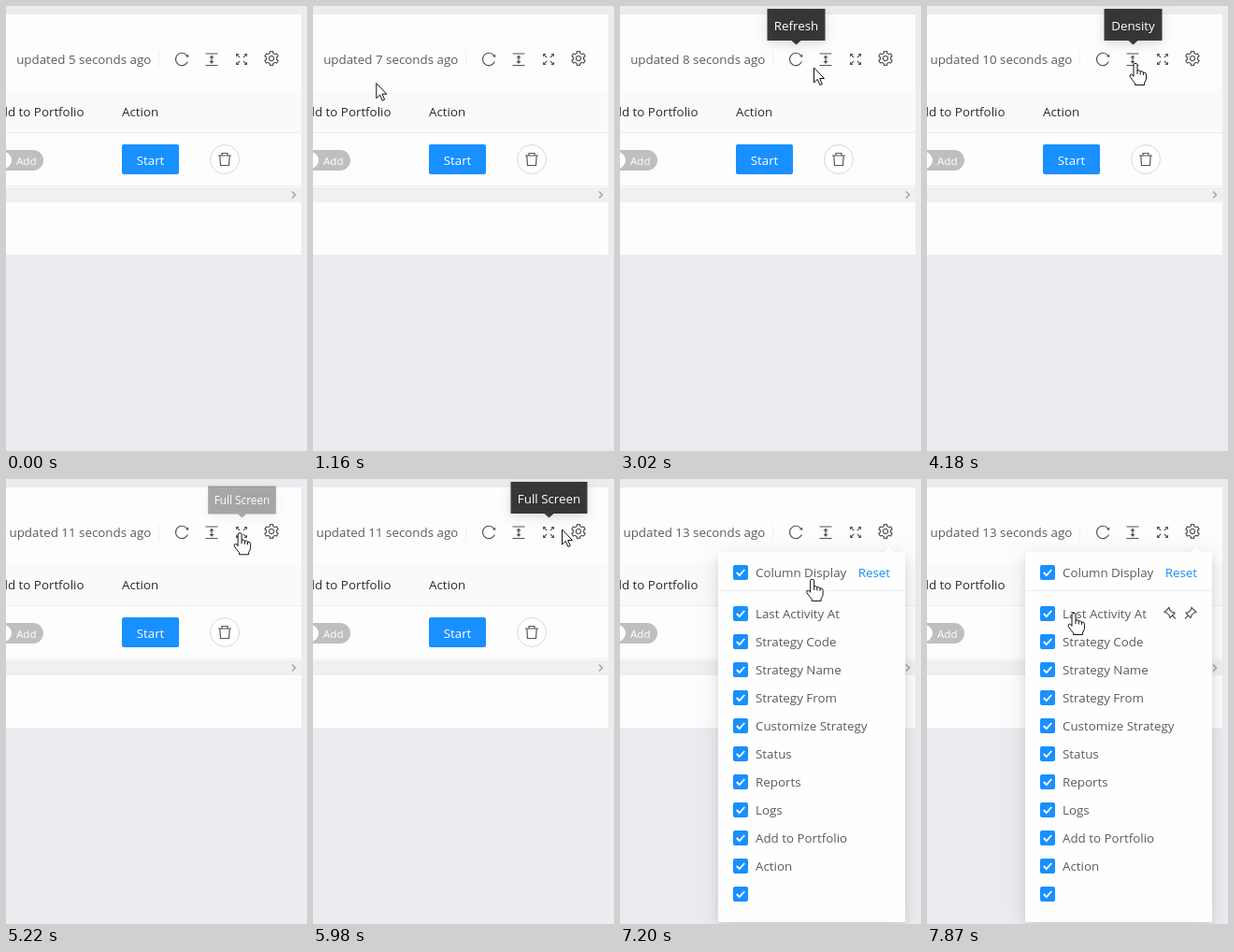
An HTML page for the animation above (8 s loop, 322 px wide and 476 px high).

```html
<!DOCTYPE html>
<html lang="en">
<head>
<meta charset="utf-8">
<title>Table toolbar</title>
<style>
  html, body { margin: 0; width: 100%; height: 100%; overflow: hidden; background: #eaecf0; }
  svg { display: block; font: 13.35px "Open Sans", "Noto Sans", sans-serif; fill: #5c5c5c; }
  .head { fill: #2b2b2b; }
  .end { text-anchor: end; }
  .mid { text-anchor: middle; }
  .line { fill: none; stroke: #555; stroke-width: 1.2; }
  .solid { fill: #555; stroke: none; }
  .white { fill: #fff; }
  .blue { fill: #1890ff; }
  .tip { filter: drop-shadow(0 3px 6px rgba(0, 0, 0, .18)); }
  .card { filter: drop-shadow(0 3px 4px rgba(0, 0, 0, .08)) drop-shadow(0 5px 12px rgba(0, 0, 0, .1)); }
  .cursor path { fill: #fff; stroke: #111; stroke-linejoin: round; }
</style>
</head>
<body>
<svg width="322" height="476" viewBox="0 0 322 476">
  <rect y="9" width="316" height="257" fill="#fdfdfd"/>
  <rect y="90" width="316" height="45" fill="#fafafa"/>
  <path d="M0 135.5H316M0 192.5H316M163.5 49V65" fill="none" stroke="#eee"/>
  <rect y="194" width="316" height="16" fill="#f0f0f0"/>
  <path d="M306 198.5l3.5 3.5-3.5 3.5" fill="none" stroke="#a0a0a0" stroke-width="1.4"/>

  <text id="age" class="end" x="155.3" y="62"></text>
  <text class="head end" x="83.5" y="118">Add to Portfolio</text>
  <text class="head" x="124" y="118">Action</text>

  <rect x="-14" y="154" width="54" height="22" rx="11" fill="#bfbfbf"/>
  <circle class="white" cx="-3" cy="165" r="9"/>
  <text class="white" x="11" y="170" font-size="11.6">Add</text>
  <rect class="blue" x="124" y="148" width="61" height="32" rx="2"/>
  <text class="white mid" x="154.5" y="170">Start</text>
  <circle cx="234" cy="164" r="15.5" fill="#fff" stroke="#d9d9d9"/>
  <path class="line" d="M227 160H241M231 160V157.5H237V160M228.8 160L229.5 170.5H238.5L239.2 160"/>

  <g class="line">
    <g transform="translate(188 57)">
      <path d="M6.4 2.4A6.7 6.7 0 1 1 5.4 -4.2"/>
      <path class="solid" d="M4 -3L7.2 -2.1V-5.5Z"/>
    </g>
    <g transform="translate(220 57)">
      <path d="M-6.5 -6H6.5M-6.5 6.5H6.5M0 -3V3"/>
      <path class="solid" d="M0 -4.4l2.5 3h-5zM0 5l2.5-3h-5z"/>
    </g>
    <g id="expand" transform="translate(252 57)"></g>
    <g transform="translate(284 56)">
      <path id="gear"/>
      <circle r="2.6"/>
    </g>
  </g>

  <g id="panel"></g>
  <g id="tips"></g>
  <g id="cursor" class="cursor">
    <path id="arrow" d="M0 0V16L3.8 12.4L6.4 18.5L8.8 17.5L6.2 11.5H11Z"/>
    <g id="hand">
      <path d="M-2 1.8Q-2 .4 0 .4Q2 .4 2 1.8V8Q4.6 7 5.2 9Q7.6 8 8.4 10Q11.5 9.6 11.5 12.3V16Q11.5 19 9.5 21V23.5H-.5V21.5Q-3 19 -5.8 14.6Q-6.4 12.2 -4.5 12.1Q-3 12.3 -2 14.3Z"/>
      <path d="M2 8V12M5.2 9V12.5M8.4 10V13"/>
    </g>
  </g>
</svg>
<script>
const LOOP = 8000, STEP = 20;
const CLICK = 6880;      // the settings panel opens
const TIP_IN = 150;      // hover time before a tooltip opens
const TIP_OUT = 300;     // time it stays after the pointer has left
const $ = id => document.getElementById(id);
const clamp = v => Math.min(1, Math.max(0, v));
const show = (el, on) => { el.style.display = on ? '' : 'none'; };

// Four diagonal arrows, one per corner.
$('expand').innerHTML = [0, 90, 180, 270].map(turn => `
  <g transform="rotate(${turn})">
    <path d="M1.8 1.8L4.8 4.8"/><path class="solid" d="M6 6H2.4L6 2.4Z"/>
  </g>`).join('');

// Six teeth, one pointing up.
const polar = (deg, r) => {
  const a = deg * Math.PI / 180;
  return `${(r * Math.sin(a)).toFixed(2)} ${(-r * Math.cos(a)).toFixed(2)}`;
};
const teeth = Array.from({ length: 6 }, (_, k) => {
  const a = k * 60;
  return [polar(a - 19, 5.7), polar(a - 12, 7.5), polar(a + 12, 7.5), polar(a + 19, 5.7)];
});
$('gear').setAttribute('d', `M${teeth.flat().join('L')}Z`);

// Column settings panel.
const columns = ['Last Activity At', 'Strategy Code', 'Strategy Name', 'Strategy From',
  'Customize Strategy', 'Status', 'Reports', 'Logs', 'Add to Portfolio', 'Action', ''];
const option = (label, y) => `
  <rect class="blue" x="121" y="${y - 8}" width="16" height="16" rx="2"/>
  <path d="M124.8 ${y}l3 3.2 5.4-6.2" fill="none" stroke="#fff" stroke-width="1.9"/>
  <text x="145" y="${y + 5}">${label}</text>`;
const pin = (x, flip) => `<path class="line" transform="translate(${x} 143.5) scale(${flip} 1)"
  d="M1 -6L6 -1L3.5 -.3L.8 2.4Q1 4 0 5L-5 0Q-4 -1 -2.4 -.8L.3 -3.5ZM-2.5 2.5L-6 6"/>`;
$('panel').innerHTML = `
  <path class="card" d="M107 78H282L287.5 72.5L293 78H303Q305 78 305 80V472Q305 474 303 474H107Q105 474 105 472V80Q105 78 107 78Z" fill="#fefefe"/>
  <path d="M105 119.5H305" stroke="#eee"/>
  ${option('Column Display', 100)}
  <text class="blue end" x="289" y="105">Reset</text>
  ${columns.map((name, i) => option(name, 144 + 30 * i)).join('')}
  <g id="pins">${pin(260, -1)}${pin(282, 1)}</g>`;

// Pointer moves; each eases out from where the last one ended.
const moves = [
  { from: 930, to: 1730, x: 150, y: 67 },
  { from: 1760, to: 2560, x: 186, y: 56 },
  { from: 2580, to: 3380, x: 213, y: 68.5 },
  { from: 3640, to: 4180, x: 223, y: 61 },
  { from: 4690, to: 5400, x: 252, y: 57 },
  { from: 5760, to: 6510, x: 281, y: 51 },
  { from: 6800, to: 7870, x: 157, y: 143 }
];
const easeOut = k => 1 - (1 - k) ** 2;
const pointer = t => moves.reduce((p, m) => {
  const k = easeOut(clamp((t - m.from) / (m.to - m.from)));
  return { x: p.x + (m.x - p.x) * k, y: p.y + (m.y - p.y) * k };
}, { x: -12, y: 98 });

// Toolbar icons 32 apart; the pointer's own path decides when each tooltip shows.
const over = (icon, p) => p.y < 66 && Math.abs(p.x - icon.x) < 7;
const icons = ['Refresh', 'Density', 'Full Screen', 'Settings'].map((label, i) => {
  const icon = { label, x: 188 + 32 * i, top: label === 'Settings' ? 2 : 3 };
  for (let t = 0; t < LOOP; t += STEP) {
    if (!over(icon, pointer(t))) continue;
    icon.enter ??= t;
    icon.leave = t;
  }
  return icon;
});
for (const icon of icons) {
  const g = document.createElementNS('http://www.w3.org/2000/svg', 'g');
  $('tips').append(g);
  g.setAttribute('class', 'tip');
  g.innerHTML = `<path fill-opacity=".76" fill="#000"/>
    <text class="white mid" x="${icon.x + .5}" y="${icon.top + 22.5}">${icon.label}</text>`;
  const half = Math.round(g.lastChild.getComputedTextLength() + 15) / 2;
  g.firstChild.setAttribute('d', `M${icon.x + .5 - half} ${icon.top}h${2 * half}v34h${5 - half}l-5 4.5l-5 -4.5h${5 - half}z`);
  icon.node = g;
}

const circOut = k => Math.sqrt(1 - (1 - k) ** 2);
const zoom = (el, k, x, y) => {
  show(el, k > 0);
  el.setAttribute('opacity', k);
  el.setAttribute('transform', `translate(${x} ${y}) scale(${.8 + .2 * k}) translate(${-x} ${-y})`);
};

function draw(t) {
  $('age').textContent = `updated ${6 + Math.floor((t - 120) / 1000)} seconds ago`;

  for (const { node, x, top, enter, leave } of icons) {
    const shown = circOut(clamp((t - enter - TIP_IN) / 100));
    const gone = clamp((t - leave - TIP_OUT) / 100) ** 2;
    zoom(node, shown * (1 - gone), x + .5, top + 39);
  }
  const open = circOut(clamp((t - CLICK) / 200));
  zoom($('panel'), open, 287, 73);

  const p = pointer(t);
  const hand = icons.some(icon => over(icon, p)) || (open > 0 && p.y > 92 && p.x < 245);
  show($('hand'), hand);
  show($('arrow'), !hand);
  show($('pins'), p.y > 129);
  $('cursor').setAttribute('transform', `translate(${p.x.toFixed(1)} ${p.y.toFixed(1)})`);
}

const start = performance.now();
function tick() {
  const t = (performance.now() - start) % LOOP;
  draw(Math.floor(t / STEP) * STEP);
  requestAnimationFrame(tick);
}
tick();
</script>
</body>
</html>
```
